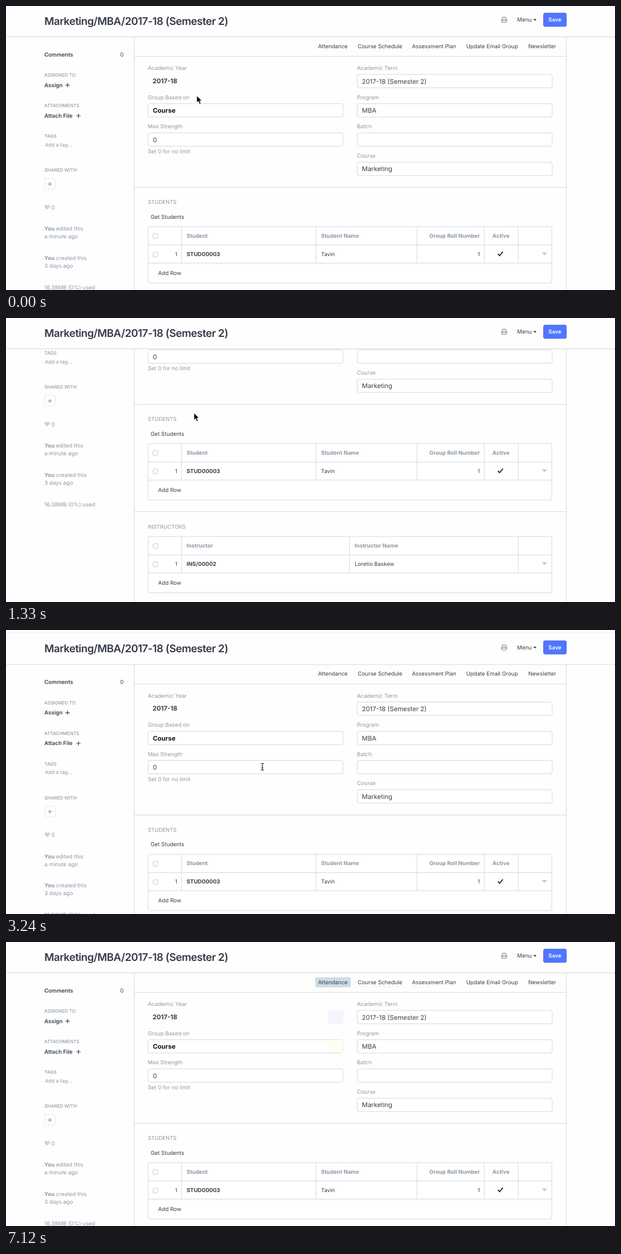
These frames come from a looping animation (1095x511 px, 8 s). An HTML page:

```html
<!DOCTYPE html>
<html lang="en">
<head>
<meta charset="utf-8">
<title>Student group form</title>
<style>
  html, body { margin: 0; width: 100%; height: 100%; overflow: hidden; background: #fefefe; }
  svg { display: block; width: 1095px; height: 511px; }
  text { font: 9.87px Inter, Roboto, sans-serif; fill: #36414c; white-space: pre; text-rendering: geometricPrecision; }
  .title { font-size: 19px; font-weight: 600; letter-spacing: -.5px; fill: #333a45; }
  .bold { font-weight: 700; }
  .semi { font-weight: 600; }
  .muted { fill: #8d99a6; }
  .caps { font-size: 8.3px; font-weight: 500; fill: #8d99a6; }
  .section { font-size: 9.57px; fill: #8d99a6; }
  .small { font-size: 9.05px; fill: #8d99a6; }
  .value { font-size: 11.52px; }
  .strong { font-size: 11.52px; font-weight: 700; fill: #111; }
  .box { fill: #fff; stroke: #d1d8dd; }
  .line { fill: none; stroke: #d1d8dd; }
  .end { text-anchor: end; }
</style>
</head>
<body>
<svg viewBox="0 0 1095 511">
  <g id="page">
    <g id="content"></g>
    <g id="header"></g>
  </g>
  <g id="cursors">
    <path id="arrow" d="M0 0V12.6L2.9 9.9 5.1 15 7.4 14 5.2 9.1H9.2Z" fill="#000" stroke="#fff" stroke-width=".8"/>
    <path id="hand" d="M-1.6-6C-1.6-7.4.4-7.4.4-6V-1.6C.8-2.6 2.4-2.4 2.5-1.2 3.2-2 4.5-1.6 4.6-.5 5.4-1 6.4-.4 6.4.6V3.2C6.4 4.8 5.4 5.4 5.4 7.3H-1.4C-1.6 5.2-3.2 4-4.3 1.9-5 .6-3.7-.3-2.7.6L-1.6 1.7ZM.4-1.6V1.4M2.5-1.2V1.6M4.6-.5V1.9" fill="#fff" stroke="#000"/>
    <path id="beam" d="M-2.8-6Q0-6 0-4.5 0-6 2.8-6M0-4.5V5M-2.8 6.2Q0 6.2 0 4.7 0 6.2 2.8 6.2M-1.5 2H1.5" fill="none" stroke="#111" stroke-width="1.1"/>
  </g>
</svg>
<script>
const byId = id => document.getElementById(id);

// Text is placed by the vertical centre of its capitals.
const text = (x, middle, label, style = '', size = 9.87) =>
  `<text x="${x}" y="${middle + size * .364}" class="${style}">${label}</text>`;
const rect = (x, y, w, h, extra = 'class="box"') =>
  `<rect x="${x}" y="${y}" width="${w}" height="${h}" ${extra}/>`;
const line = d => `<path d="${d}" class="line"/>`;
const plus = (x, y, color = '#36414c', r = 3.8) =>
  `<path d="M${x - r} ${y}h${2 * r}M${x} ${y - r}v${2 * r}" stroke="${color}" stroke-width="1.2"/>`;

function field(x, y, label, value, style = 'value') {
  return text(x, y - 11.3, label, 'muted') +
    rect(x + .5, y + .3, 350.5, 24, 'class="box" rx="3"') +
    text(x + 9, y + 12.6, value, style, 11.52);
}

function table(top, columns, heads, cells) {
  const checkbox = y => rect(264.5, y - 4, 8.4, 8.4, 'fill="#fff" stroke="#c3cbd1" rx="1.5"');
  const place = (entry, y, style) =>
    text(entry[0], y, entry[1], `${style} ${entry[2] || ''}`);
  return rect(255.5, top, 726, 101.3, 'class="box" rx="2.5"') +
    line(`M255.5 ${top + 33}h726M255.5 ${top + 65.5}h726`) +
    columns.map(x => line(`M${x} ${top}v65.5`)).join('') +
    checkbox(top + 16.8) + checkbox(top + 49.8) +
    text(308, top + 49, '1', 'end') +
    heads.map(h => place(h, top + 16, 'bold muted')).join('') +
    cells.map((c, i) => place(c, top + 49, i ? '' : 'bold')).join('') +
    `<path d="M963.3 ${top + 46.4}h9.8l-4.9 5z" fill="#c3c9ce"/>` +
    text(273.5, top + 83.3, 'Add Row');
}

function sidebar() {
  const items = [
    [87, 'Comments', 'semi'], [142, 'Assign', 'semi'], [197, 'Attach File', 'semi'],
    [400.5, '<tspan class="bold">You</tspan> edited this', 'muted'], [414.5, 'a minute ago', 'muted'],
    [453.3, '<tspan class="bold">You</tspan> created this', 'muted'], [467.3, '3 days ago', 'muted'],
    [506, '16.38MB (0%) used', 'muted']
  ];
  const heads = [[124, 'ASSIGNED TO'], [179, 'ATTACHMENTS'], [234, 'TAGS'], [295, 'SHARED WITH']];
  return items.map(([y, label, style]) => text(69, y, label, style)).join('') +
    heads.map(([y, label]) => text(69, y, label, 'caps', 8.3)).join('') +
    text(211.5, 87, '0', 'end') + text(70, 249.7, 'Add a tag...', 'small', 9.05) +
    plus(110.7, 142.3) + plus(130.3, 197.5) +
    rect(69.5, 310.5, 19, 19, 'fill="none" stroke="#d1d8dd" stroke-dasharray="2 1.5" rx="2"') +
    plus(79, 320.3, '#8d99a6') +
    '<path d="M74 366.4L69.8 362C67.6 358.8 71.8 355.8 74 359 76.2 355.8 80.4 358.8 78.2 362Z" fill="#ccd2d7"/>' +
    text(81.5, 362, '0', 'muted');
}

function toolbar() {
  const links = [[561, 'Attendance'], [632.5, 'Course Schedule'], [730, 'Assessment Plan'],
    [827.5, 'Update Email Group'], [939, 'Newsletter']];
  return rect(556, 63.5, 64, 18, 'id="hover" fill="#d1dce3" rx="2.5"') +
    rect(555.4, 62.9, 65.2, 19.2, 'id="focus" fill="none" stroke="#84b6ea" stroke-width="2.4" rx="2.5"') +
    links.map(([x, label]) => text(x, 72.3, label)).join('');
}

byId('content').innerHTML =
  line('M230.5 40V686.7H1007.5V40M230.5 90.5h777M230.5 326.3h777M230.5 519.6h777') +
  sidebar() + toolbar() +
  text(255, 111.7, 'Academic Year', 'muted') + text(263.5, 134.8, '2017-18', 'value bold', 11.52) +
  field(255, 175.5, 'Group Based on', 'Course', 'strong') +
  field(255, 228, 'Max Strength', '0') +
  text(255, 261.5, 'Set 0 for no limit', 'muted') +
  field(631, 122.8, 'Academic Term', '2017-18 (Semester 2)') +
  field(631, 175.5, 'Program', 'MBA') +
  field(631, 228, 'Batch', '') +
  field(631, 280.7, 'Course', 'Marketing') +
  text(255, 353, 'STUDENTS', 'section', 9.57) + text(260, 379, 'Get Students') +
  table(397.1, [315.7, 557.7, 739, 860, 921],
    [[324.7, 'Student'], [566.5, 'Student Name'], [852, 'Group Roll Number', 'end'], [874.5, 'Active']],
    [[324.7, 'STUD00003'], [566.5, 'Tavin'], [852, '1', 'end']]) +
  '<path d="M884.6 446l2.9 3.2 6-7" fill="none" stroke="#2b333b" stroke-width="2"/>' +
  text(255, 546.5, 'INSTRUCTORS', 'section', 9.57) +
  table(564.2, [315.7, 617.7, 921],
    [[324.7, 'Instructor'], [627, 'Instructor Name']],
    [[324.7, 'INS/00002'], [627, 'Loretio Baskew']]) +
  `<g id="residue">${rect(578, 123, 28.5, 24, 'fill="#f5f6fb"')}${rect(578, 176.5, 28, 22.5, 'fill="#fffff0"')}
    <path d="M627 80.5h90M725 80.5h20" stroke="#f0f3f5"/></g>`;

byId('header').innerHTML =
  rect(0, -30, 1095, 85.5, 'fill="#fefefe"') +
  line('M0 55.5H1095') + '<path d="M0 -1.3H1095" stroke="#e6eaed"/>' +
  text(69, 27, 'Marketing/MBA/2017-18 (Semester 2)', 'title', 19) +
  '<path d="M892.5 24v-3.6h6.4V24M892.5 27.6h-1.7v-3.5h9.8v3.5h-1.7M892.5 26.3h6.4v3.4h-6.4z" fill="none" stroke="#8d99a6" stroke-width="1.1"/>' +
  text(919, 24.6, 'Menu') + '<path d="M948 23.4h6l-3 3.3z" fill="#36414c"/>' +
  rect(966.5, 12.8, 41, 24, 'fill="#5275ff" stroke="#4668f2" rx="2.5"') +
  '<g style="--c:#fff">' + text(975.3, 24.6, 'Save', 'semi').replace('<text', '<text style="fill:#fff"') + '</g>';

// start time, scroll distance (negative is overscroll)
const scrolls = [[0, 0], [740, 3], [890, 38], [1040, 89.7], [1180, 138], [1330, 171], [1620, 190.5],
  [1770, 192.6], [2950, 95], [3090, -5.7], [3240, -6.5], [3390, -2.6], [3530, -.8], [3680, 0]];

// start time, pointer shape, position
const pointers = [[0, 'arrow', 343, 161.5], [290, 'arrow', 338, 171], [2060, 'arrow', 332.5, 253],
  [2210, 'arrow', 352, 255], [2360, 'hand', 360, 262], [2500, 'arrow', 432, 262], [2950, 'arrow', 452, 250],
  [3090, 'beam', 461, 246], [3390, 'arrow', 514, 186], [3530, 'arrow', 567, 108],
  [3680, 'hand', 584.5, 85.5], [6970, 'arrow', 735, 196], [7120, 'none', 0, 0]];

const at = (keys, t) => keys.findLast(key => key[0] <= t);
const show = (id, visible) => byId(id).setAttribute('visibility', visible ? 'visible' : 'hidden');
const move = (id, x, y) => byId(id).setAttribute('transform', `translate(${x} ${y})`);

function draw(now) {
  const t = now % 8000;
  const scroll = at(scrolls, t)[1];
  const [, shape, x, y] = at(pointers, t);
  move('content', 0, -Math.max(scroll, 0));
  move('page', 0, Math.max(-scroll, 0));
  for (const id of ['arrow', 'hand', 'beam']) show(id, id === shape);
  if (shape !== 'none') move(shape, x, y);
  show('hover', t >= 3830);
  show('focus', t >= 6230 && t < 6380);
  show('residue', t >= 6970);
}

const start = performance.now();
function tick() {
  draw(performance.now() - start);
  requestAnimationFrame(tick);
}
tick();
</script>
</body>
</html>
```
